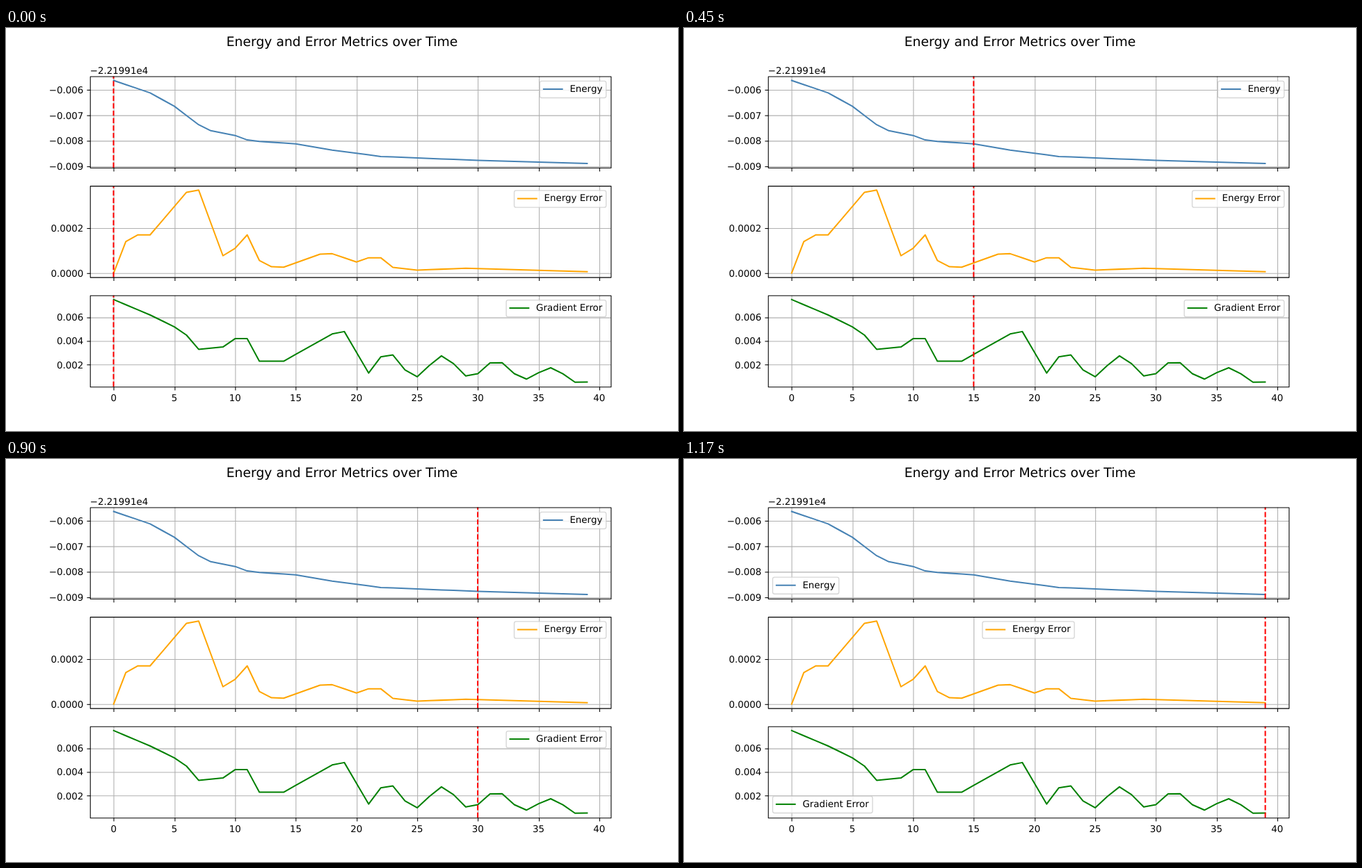
Animation of 966x580 px, one loop 1.2 s. Source, as an HTML page with a canvas:

```html
<!DOCTYPE html>
<html lang="en">
<head>
<meta charset="utf-8">
<title>Energy and Error Metrics over Time</title>
<style>
html, body { margin: 0; overflow: hidden; background: #fff; }
canvas { display: block; }
</style>
</head>
<body>
<canvas width="966" height="580"></canvas>
<script>
const ctx = document.querySelector('canvas').getContext('2d');
const LEFT = 125, RIGHT = 900, ROW_H = 462 / 3.4;
const EM = 100 / 7.2, THIN = 8 / 7.2, THICK = 15 / 7.2;
const TICK = 5, LEGEND_H = 25, LEGEND_PAD = EM / 2;
const STEPS = 40, STEP_MS = 30;

// Piecewise linear curve through "step:value" key points
function through(keys) {
  const points = keys.split(' ').map(key => key.split(':').map(Number));
  return i => {
    const k = Math.max(1, points.findIndex(([step]) => step >= i));
    const [x0, y0] = points[k - 1], [x1, y1] = points[k];
    return y0 + (y1 - y0) * (i - x0) / (x1 - x0);
  };
}

// Ripple that sinks and fades after its first crest
function ripple(i) {
  const u = i - 22.6;
  return 1.95 - .0042 * u * u + (1.05 - .037 * u) * Math.cos(2 * Math.PI * u / 4.5);
}

const gradientStart = through('0:7.5 3:6.2 5:5.2 6:4.5 7:3.3 9:3.5 10:4.2 11:4.2 12:2.3 14:2.3 18:4.6 19:4.8 21:1.3');

const charts = [
  {
    name: 'Energy', color: '#4682b4', moveAt: 36, moveTo: 'lower left',
    min: -8.884, max: -5.643, firstTick: -9, tickStep: 1, digits: 3,
    curve: through('0:-5.643 3:-6.125 5:-6.65 7:-7.37 8:-7.605 10:-7.79 11:-7.965 12:-8.02 15:-8.12 18:-8.36 22:-8.61 30:-8.762 39:-8.884')
  },
  {
    name: 'Energy Error', color: '#ffa500', moveAt: 33, moveTo: 'upper center',
    min: 0, max: 3.7, firstTick: 0, tickStep: 2, digits: 4,
    curve: through('0:0 1:1.4 2:1.7 3:1.7 6:3.6 7:3.7 9:.77 10:1.1 11:1.7 12:.56 13:.28 14:.26 17:.84 18:.86 20:.49 21:.68 22:.68 23:.25 25:.13 29:.21 39:.06')
  },
  {
    name: 'Gradient Error', color: '#008000', moveAt: 33, moveTo: 'lower left',
    min: .5, max: 7.5, firstTick: 2, tickStep: 2, digits: 3,
    curve: i => i <= 21 ? gradientStart(i) : ripple(i)
  }
];

charts.forEach((chart, row) => {
  const { min, max } = chart, top = 72 + row * ROW_H * 1.2;
  chart.top = top;
  chart.bottom = top + ROW_H;
  chart.y = v => top + ROW_H * (1 / 22 + (max - v) / (max - min) / 1.1);
  chart.points = Array.from({ length: STEPS }, (_, i) => [xAt(i), chart.y(chart.curve(i))]);
});

function xAt(i) {
  return LEFT + (i + 1.95) / 42.9 * (RIGHT - LEFT);
}

function snap(v) {
  return Math.round(v) + .5;
}

function line(points, color, width, cap = 'butt') {
  ctx.strokeStyle = color;
  ctx.lineWidth = width;
  ctx.lineCap = cap;
  ctx.beginPath();
  for (const [x, y] of points) ctx.lineTo(x, y);
  ctx.stroke();
}

function text(str, x, y, align = 'left', size = EM) {
  ctx.font = `${size}px "DejaVu Sans", sans-serif`;
  ctx.textAlign = align;
  ctx.fillStyle = '#000';
  ctx.fillText(str, x, Math.round(y));
}

function drawLegend(chart, place) {
  ctx.font = `${EM}px "DejaVu Sans", sans-serif`;
  const width = ctx.measureText(chart.name).width + 3.6 * EM;
  const x = place.endsWith('right') ? RIGHT - LEGEND_PAD - width
    : place.endsWith('left') ? LEFT + LEGEND_PAD
    : (LEFT + RIGHT - width) / 2;
  const y = place.startsWith('upper') ? chart.top + LEGEND_PAD
    : chart.bottom - LEGEND_PAD - LEGEND_H;
  ctx.beginPath();
  ctx.roundRect(x, y, width, LEGEND_H, EM / 5);
  ctx.globalAlpha = .8;
  ctx.fillStyle = '#fff';
  ctx.fill();
  ctx.strokeStyle = '#ccc';
  ctx.lineWidth = 10 / 7.2;
  ctx.stroke();
  ctx.globalAlpha = 1;
  const mid = Math.round(y + 11.9), start = x + .4 * EM;
  line([[start, mid], [start + 2 * EM, mid]], chart.color, THICK, 'square');
  text(chart.name, start + 2.8 * EM, y + 16.3);
}

function drawChart(chart, step) {
  const { top, bottom } = chart;
  const edgeX = snap(LEFT), edgeY = snap(bottom);
  for (let i = 0; i <= 40; i += 5) {
    const x = snap(xAt(i));
    line([[x, top], [x, bottom]], '#b0b0b0', THIN);
    line([[x, edgeY], [x, edgeY + TICK]], '#000', THIN);
  }
  for (let v = chart.firstTick; v < chart.max; v += chart.tickStep) {
    const exact = chart.y(v), y = snap(exact);
    if (exact > bottom) continue;
    line([[LEFT, y], [RIGHT, y]], '#b0b0b0', THIN);
    line([[edgeX - TICK, y], [edgeX, y]], '#000', THIN);
    const label = (v / 10 ** chart.digits).toFixed(chart.digits).replace('-', '−');
    text(label, LEFT - 70 / 7.2, exact + 5.3, 'right');
  }

  line(chart.points, chart.color, THICK, 'square');
  const cursor = Math.round(xAt(step));
  ctx.setLineDash([3.7 * THICK, 1.6 * THICK]);
  line([[cursor, Math.round(bottom)], [cursor, Math.round(top)]], '#f00', THICK);
  ctx.setLineDash([]);

  ctx.strokeStyle = '#000';
  ctx.lineWidth = THIN;
  ctx.strokeRect(edgeX, snap(top), RIGHT - LEFT, edgeY - snap(top));
  drawLegend(chart, step < chart.moveAt ? 'upper right' : chart.moveTo);
}

function draw(now) {
  const step = Math.floor(now / STEP_MS) % STEPS;
  ctx.setTransform(1, 0, 0, 1, 0, 0);
  ctx.fillStyle = '#fff';
  ctx.fillRect(0, 0, 966, 580);
  ctx.scale(.966, 580 / 600);
  ctx.lineJoin = 'round';
  ctx.textRendering = 'geometricPrecision';
  text('Energy and Error Metrics over Time', 500, 27, 'center', 1.4 * EM);
  text('−2.21991e4', LEFT, 68);
  for (const chart of charts) drawChart(chart, step);
  for (let i = 0; i <= 40; i += 5) text(i, xAt(i), 555, 'center');
  requestAnimationFrame(draw);
}
requestAnimationFrame(draw);
</script>
</body>
</html>
```
